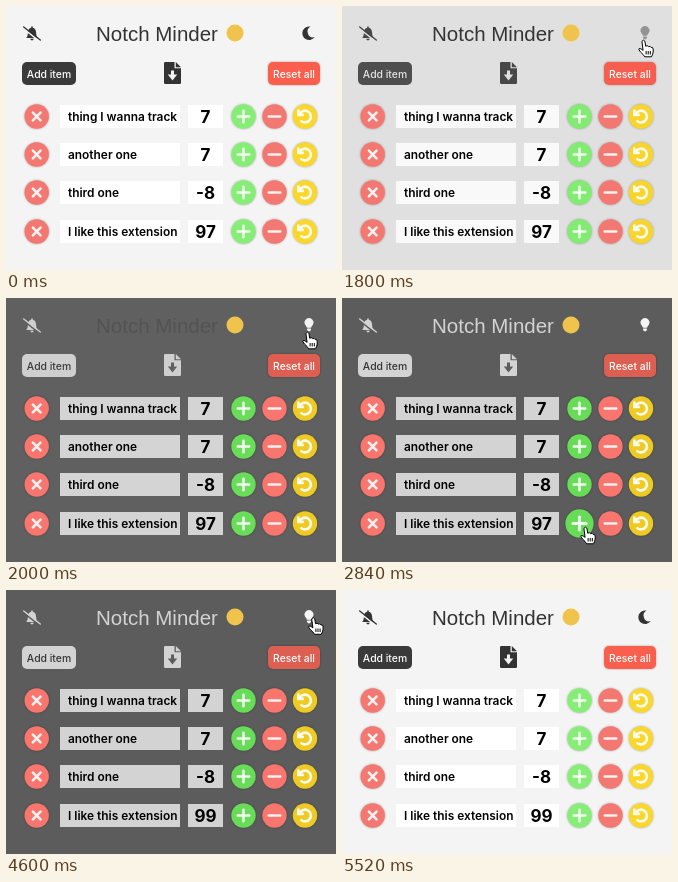
An HTML page that plays this animation: 330 px wide and 264 px high, repeating every 5920 ms.

```html
<!DOCTYPE html>
<html lang="en">
<head>
<meta charset="utf-8">
<title>Counter list</title>
<style>
  html, body { margin: 0; height: 100%; overflow: hidden; }
  svg { display: block; width: 330px; height: 264px; background: var(--bg); }
  text { font: 500 10.4px Inter, sans-serif; text-anchor: middle; }
  .title { font: 20.5px "Liberation Sans", Arial, sans-serif; text-anchor: start; fill: var(--title); }
  .label { font: 600 11.9px Inter, sans-serif; text-anchor: start; }
  .count { font: 700 17px Inter, sans-serif; }
  .ink { fill: var(--ink); }
  .bg { fill: var(--bg); }
  .field { fill: var(--field); }
  .sign { fill: none; stroke: #fff; stroke-width: 2.6; stroke-linecap: round; stroke-opacity: .9; }
  .raised { filter: drop-shadow(0 0 1px rgba(0, 0, 0, .3)); }
</style>
</head>
<body>
<svg id="stage" viewBox="0 0 330 264">
  <g transform="translate(26 27.5)">
    <path class="ink" d="M-5.8 4.4Q-4 2.5-4-1.2Q-3.8-5-.8-5.7V-7H.8V-5.7Q3.8-5 4-1.2Q4 2.5 5.8 4.4ZM-1.8 5.2H1.8Q1.4 7 0 7Q-1.4 7-1.8 5.2Z"/>
    <path d="M-9.2-5.3L7.4 7.7" stroke="var(--bg)" stroke-width="1.6"/>
    <path d="M-8.3-6.5L8.3 6.5" stroke="var(--ink)" stroke-width="1.4" stroke-linecap="round"/>
  </g>
  <text class="title" x="90" y="35">Notch Minder</text>
  <circle cx="229" cy="27" r="8.5" fill="#f0c44c"/>
  <path id="moon" transform="translate(302.7 27.3)" d="M2-6.7A6.8 6.8 0 1 0 6 3.8A5.65 5.65 0 0 1 2-6.7Z"/>
  <path id="bulb" transform="translate(303 27.5) scale(.88)" d="M-2.4 2.5Q-2.6 1.2-4-.3A5 5 0 1 1 4-.3Q2.6 1.2 2.4 2.5ZM-2.2 3.3H2.2V5.1L1 6.5H-1L-2.2 5.1Z"/>

  <rect x="16" y="56" width="54" height="23" rx="5" fill="var(--button)"/>
  <text x="43" y="72" fill="var(--caption)">Add item</text>
  <path class="ink" d="M159.2 56H168.5V62.3H175V76.8Q175 78 173.8 78H159.2Q158 78 158 76.8V57.2Q158 56 159.2 56ZM169.8 56L175 61.2H169.8Z"/>
  <path class="bg" d="M165 64.5H168V68.5H171.2L166.5 74.5L161.8 68.5H165Z"/>
  <rect class="raised" x="262" y="56" width="52" height="23" rx="5" fill="var(--reset)"/>
  <text x="288" y="72" fill="#fff">Reset all</text>

  <g id="rows"></g>
  <g id="cursor" stroke-width="1" stroke-linejoin="round">
    <path id="arrow" fill="#000" stroke="#fff" d="M0 0V13.5L3.2 10.6L5.3 15.4L7.6 14.4L5.5 9.8H9.6Z"/>
    <g id="hand">
      <path fill="#fff" stroke="#000" d="M-1.6 1.4Q0-1 1.4 1.2L2.2 6.2Q4 5 5 6.6Q7 5.8 7.6 7.4Q9.6 7 9.7 9V12Q9.5 14 8 16.8H1.2Q0 14.5-3 12Q-5.5 9.2-4.4 8.6Q-2.8 8-.4 10.4Z"/>
      <path stroke="#000" d="M2.6 11V14.5M4.7 11V14.5M6.8 11V14.5"/>
    </g>
  </g>
</svg>
<script>
const LOOP = 5920, TO_DARK = 1764, TO_LIGHT = 4640;
const $ = id => document.getElementById(id);
const stage = $('stage');
const clamp = v => Math.max(0, Math.min(1, v));

const rows = [['thing I wanna track', 7], ['another one', 7], ['third one', -8], ['I like this extension', 97]];
const signs = [
  [30.7, 'red', 'M-3.8-3.8L3.8 3.8M3.8-3.8L-3.8 3.8'],
  [237.5, 'green', 'M-5.7 0H5.7M0-5.7V5.7'],
  [268.5, 'red', 'M-5.7 0H5.7'],
  [299, 'yellow', 'M-5.4-2.4A5.9 5.9 0 1 1-3.6 4.7M-6.6-6V-1.6H-2.2']
];
const buttons = [];

$('rows').innerHTML = rows.map(([label, count], i) => {
  const y = Math.round(110.7 + 38.3 * i);
  return `<rect class="field" x="54" y="${y - 12}" width="120" height="23"/>
    <text class="label" x="62" y="${y + 4}">${label}</text>
    <rect class="field" x="182" y="${y - 12}" width="35" height="23"/>
    <text class="count" x="199.5" y="${y + 6}">${count}</text>` +
    signs.map(([x, color, d]) => {
      buttons.push({ x, y: y - .5 });
      return `<g class="round"><circle class="raised" r="12.2" fill="var(--${color})"/><path class="sign" d="${d}"/></g>`;
    }).join('');
}).join('');
const rounds = document.querySelectorAll('.round');
const lastCount = [...document.querySelectorAll('.count')].pop();

// CSS "ease": cubic-bezier(.25, .1, .25, 1)
function ease(x) {
  x = clamp(x);
  const bezier = (a, b, s) => 3 * a * s * (1 - s) ** 2 + 3 * b * s * s * (1 - s) + s ** 3;
  let lo = 0, hi = 1;
  for (let i = 0; i < 20; i++) {
    const mid = (lo + hi) / 2;
    if (bezier(.25, .25, mid) < x) lo = mid; else hi = mid;
  }
  return bezier(.1, 1, lo);
}

const mix = (a, b, k) => `rgb(${a.map((v, i) => Math.round(v + (b[i] - v) * k))})`;
const grey = v => [v, v, v];

// time, x, y of the pointer tip
const path = [
  [600, 166, 272], [720, 158, 252], [880, 158, 252], [1440, 301.5, 34], [2080, 301.5, 34],
  [2640, 243.5, 229], [3280, 243.5, 229], [3680, 269.5, 59.5], [3860, 269.5, 59.5],
  [4280, 307.3, 27.5], [5040, 307.3, 27.5], [5500, 250, 272]
];
function pointerAt(t) {
  const i = path.findIndex(p => p[0] > t);
  if (i < 1) return [-50, -50];
  const [t0, x0, y0] = path[i - 1], [t1, x1, y1] = path[i];
  const u = (t - t0) / (t1 - t0), k = u * u * (3 - 2 * u);
  return [x0 + (x1 - x0) * k, y0 + (y1 - y0) * k];
}

function draw(t) {
  const fade = start => ease((t - start) / 300);
  // the title inherits its colour, so its change trails behind
  const trail = start => clamp((t - start) / 650) ** 1.6;
  const dark = fade(TO_DARK) - fade(TO_LIGHT);
  const late = trail(TO_DARK) - trail(TO_LIGHT);
  const colors = {
    bg: mix(grey(244), grey(92), dark),
    ink: mix(grey(51), grey(211), dark),
    title: mix(grey(51), grey(211), late),
    field: mix(grey(255), grey(211), dark),
    button: mix(grey(58), grey(211), dark),
    caption: mix(grey(255), grey(51), dark),
    reset: mix([250, 95, 78], [221, 95, 82], dark),
    red: mix([242, 120, 113], [248, 118, 110], dark),
    green: mix([134, 238, 118], [104, 220, 88], dark),
    yellow: mix([250, 215, 45], [238, 203, 36], dark)
  };
  for (const name in colors) stage.style.setProperty('--' + name, colors[name]);

  const night = t >= TO_DARK && t < TO_LIGHT;
  $('moon').style.display = night ? 'none' : '';
  $('bulb').style.display = night ? '' : 'none';
  $('moon').setAttribute('fill', mix(grey(51), grey(211), late ** 2));
  $('bulb').setAttribute('fill', mix(grey(51), grey(245), clamp(dark) ** .35));

  lastCount.textContent = 97 + (t >= 2920) + (t >= 3120);

  const [x, y] = pointerAt(t);
  let over = (y > 56 && y < 79 && (x > 262 || Math.abs(x - 166) < 9)) || Math.hypot(x - 303, y - 27) < 10;
  buttons.forEach((b, i) => {
    const distance = Math.hypot(x - b.x, y - b.y);
    over ||= distance < 13;
    const scale = 1 + .16 * clamp((16 - distance) / 6);
    rounds[i].setAttribute('transform', `translate(${b.x} ${b.y}) scale(${scale})`);
  });
  $('cursor').setAttribute('transform', `translate(${x} ${y})`);
  $('hand').style.display = over ? '' : 'none';
  $('arrow').style.display = over ? 'none' : '';
}

function tick() {
  draw(performance.now() % LOOP);
  requestAnimationFrame(tick);
}
tick();
</script>
</body>
</html>
```
